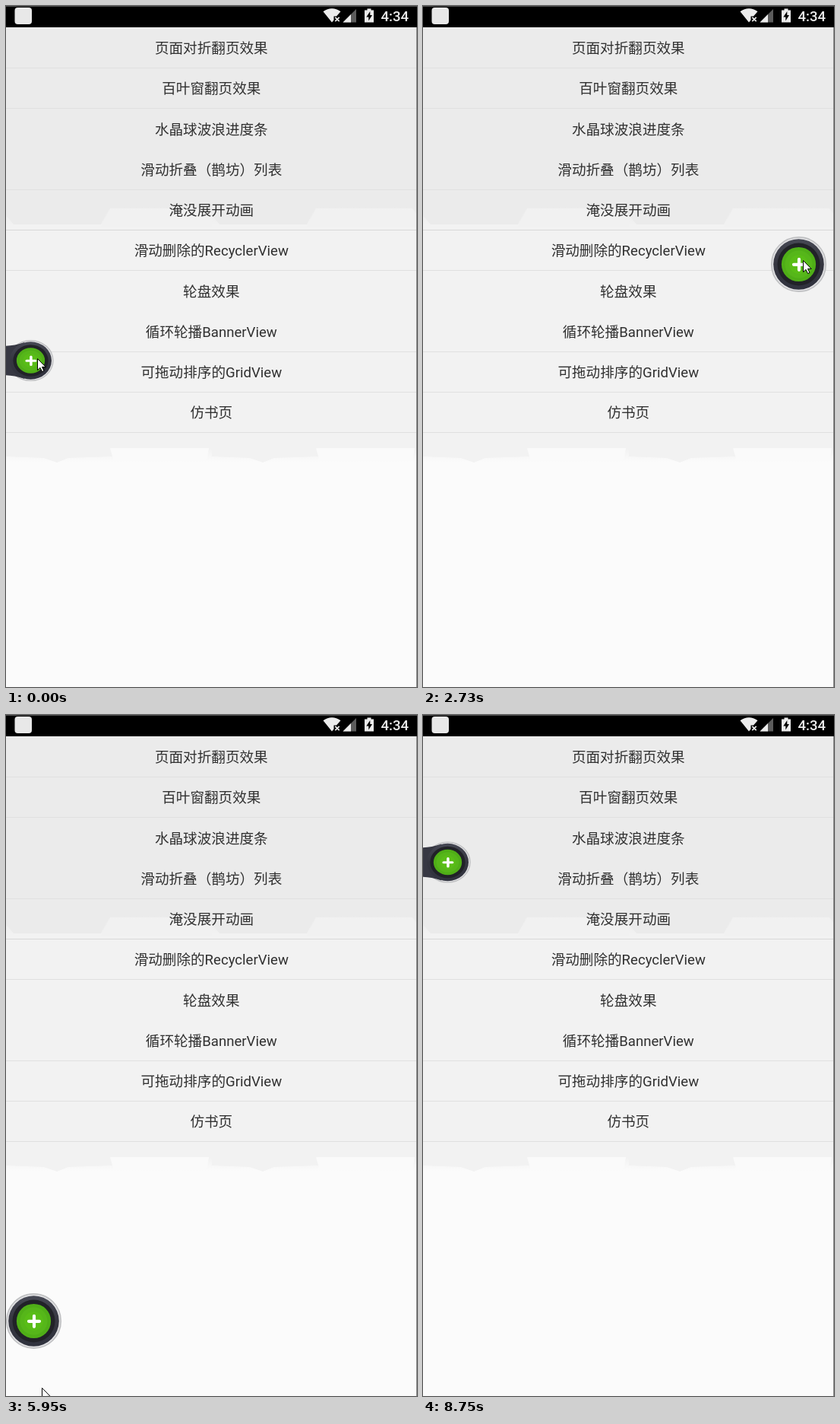
Write an HTML page that moves like this. It is 541 px wide and 895 px high and loops after 9.03 s.

```html
<!DOCTYPE html>
<html lang="zh">
<head>
<meta charset="utf-8">
<title>List with a floating button</title>
<style>
  html, body { margin: 0; width: 100%; height: 100%; overflow: hidden; background: #fbfbfb; }
  svg { display: block; width: 100%; height: 100%; }
  text { font-family: Roboto, "Noto Sans CJK SC", "Noto Sans CJK", sans-serif; }
  #rows text { font-size: 18.6px; fill: #303030; text-anchor: middle; }
  .time { font-size: 18.6px; font-weight: 500; fill: #ececec; }
</style>
</head>
<body>
<svg viewBox="0 0 541 895" preserveAspectRatio="none">
  <defs>
    <linearGradient id="upperFade" x2="0" y2="1">
      <stop offset="0" stop-color="#ebebeb"/><stop offset="1" stop-color="#f2f2f2"/>
    </linearGradient>
    <linearGradient id="lowerFade" x2="0" y2="1">
      <stop offset="0" stop-color="#f2f2f2"/><stop offset="1" stop-color="#fbfbfb"/>
    </linearGradient>
    <linearGradient id="rim" x2="0" y2="1">
      <stop offset="0" stop-color="#464854"/><stop offset=".5" stop-color="#353640"/><stop offset="1" stop-color="#30323e"/>
    </linearGradient>
    <g id="edges">
      <rect y="264" width="271" height="24" fill="url(#upperFade)"/>
      <path d="M0 264H137L125 287H10L0 275Z" fill="#ebebeb"/>
      <path d="M137 266H264L271 276V290H125Z" fill="#f1f1f1"/>
      <rect y="582" width="271" height="18" fill="url(#lowerFade)"/>
      <path d="M0 580H137L140 592L82 594L67 600L50 594L0 592Z" fill="#f2f2f2"/>
      <path d="M137 581H267L264 598H142Z" fill="#fafafa"/>
    </g>
  </defs>

  <rect width="541" height="895" fill="#fbfbfb"/>
  <rect y="28" width="541" height="236" fill="#ebebeb"/>
  <rect y="264" width="541" height="320" fill="#f2f2f2"/>
  <use href="#edges"/>
  <use href="#edges" x="271"/>
  <g id="rows"></g>

  <g id="button">
    <circle r="35.7" fill="#e2e2e4" stroke="#c0c1c3" stroke-width="1.7"/>
    <path id="tail" d="M-42 -26C-32 -26 -22 -28 -10 -32.5V32.5C-22 28 -32 26 -42 26Z" fill="#373843"/>
    <circle r="33.3" fill="url(#rim)"/>
    <circle r="28" fill="#212228"/>
    <circle r="22.6" fill="#4fae17"/>
    <circle r="18" fill="#56b61a"/>
    <circle r="12.5" fill="#59bd17"/>
    <path d="M-6.5 .3H7.5M.5 -6.7V7.3" stroke="#fff" stroke-width="4.2" stroke-linecap="round"/>
  </g>

  <g id="status">
    <rect width="541" height="28"/>
    <rect width="541" height="1" fill="#4a4a4a"/>
    <rect x="11.5" y="2" width="22.5" height="22" rx="4" fill="#e8e8e8"/>
    <path d="M429 21.5L417.5 7.2Q429 -.6 440.5 7.2L435 13.5H431.5V18.5Z" fill="#ececec"/>
    <path d="M433.3 14.8L438.7 20.2M438.7 14.8L433.3 20.2" stroke="#ececec" stroke-width="1.7"/>
    <path d="M443.5 21.5L461 4V21.5Z" fill="#5c5c5c"/>
    <path d="M443.5 21.5L454 11V21.5Z" fill="#ececec"/>
    <path d="M472 5.5H475.5V3.5H480.5V5.5H484V21.5H472Z" fill="#ececec"/>
    <path d="M479.3 7L474.3 14.5H477.3V19.5L482 12H479.3Z"/>
    <text class="time" x="493.5" y="20.3">4:34</text>
  </g>
  <rect x="540" y="28" width="1" height="867" fill="#858585"/>

  <path id="cursor" d="M.5 .5V15.6L4 12.4L6.6 17.6L9 16.5L6.5 11.4H11.2Z" fill="#fff" stroke="#000"/>
</svg>
<script>
const LOOP = 9030, STEP = 135, LAG = STEP;
const $ = id => document.getElementById(id);
const clamp = (v, min, max) => Math.min(max, Math.max(min, v));

const labels = ["页面对折翻页效果", "百叶窗翻页效果", "水晶球波浪进度条", "滑动折叠（鹊坊）列表",
  "淹没展开动画", "滑动删除的RecyclerView", "轮盘效果", "循环轮播BannerView",
  "可拖动排序的GridView", "仿书页"];
const unlined = [2, 6];
$("rows").innerHTML = labels.map((label, i) => {
  const y = Math.round(81 + i * 53.25);
  const line = unlined.includes(i) ? "" :
    `<rect y="${y}" width="541" height="1" fill="${i === 4 ? "#d8d8d8" : "#e0e0e0"}"/>`;
  return `${line}<text x="270.3" y="${y - 19}">${label}</text>`;
}).join("");

// The screen refreshes every STEP, counted anew from each of these moments
const bursts = [0, 1190, 2310, 4480, 5560, 6610, 7660];

// Key points of the pointer: time, x, y
const pointer = [
  [0, 41, 463], [720, 35, 463], [1190, 46, 478], [1325, 87, 525], [1460, 101, 529],
  [1730, 230, 510], [2000, 386, 377], [2580, 494, 339], [2715, 500, 334], [3390, 506, 355],
  [4065, 506, 355], [4200, 509, 340], [4480, 509, 388], [4750, 498, 586], [5020, 328, 723],
  [5290, 83, 744], [5425, 12, 795], [5830, 36, 796], [5965, 47, 884], [6460, 60, 880],
  [6610, 109, 645], [6745, 111, 236], [6880, 96, 217], [7400, 37, 193], [8210, 411, 575],
  [8630, 461, 884], [8750, 480, 900]];

// Resting places at the screen edge; side 1 = left, -1 = right
const docks = [
  { from: 0, to: 1300, x: 32.5, y: 466, side: 1 },
  { from: 2950, to: 4600, x: 507.5, y: 333, side: -1 },
  { from: 7650, to: LOOP, x: 32.5, y: 193.5, side: 1 }];

function pointerAt(t) {
  const next = pointer.findIndex(p => p[0] > t);
  if (next < 0) return pointer[pointer.length - 1].slice(1);
  const [t0, x0, y0] = pointer[next - 1], [t1, x1, y1] = pointer[next];
  const k = (t - t0) / (t1 - t0);
  return [x0 + (x1 - x0) * k, y0 + (y1 - y0) * k];
}

// The dragged button trails the pointer and stays on the screen
function buttonAt(t) {
  const [x, y] = pointerAt(t - LAG);
  return [clamp(x, 36, 504), clamp(y, 65, 858)];
}

function refreshTime(time) {
  const start = bursts.filter(b => b <= time).pop();
  return start + STEP * Math.floor((time - start + 20) / STEP);
}

function place(id, x, y, scale = "") {
  $(id).setAttribute("transform", `translate(${x} ${y}) ${scale}`);
}

function draw(now) {
  const t = refreshTime(now % LOOP);
  const dock = docks.find(d => t >= d.from && t < d.to);
  $("tail").style.display = dock ? "" : "none";
  if (dock) place("button", dock.x, dock.y, `scale(${0.825 * dock.side} .74)`);
  else place("button", ...buttonAt(t).map(v => Math.round(v) + 0.5));
  place("cursor", ...pointerAt(t).map(Math.round));
}

const start = performance.now();
function loop() {
  draw(performance.now() - start);
  requestAnimationFrame(loop);
}
loop();
</script>
</body>
</html>
```
